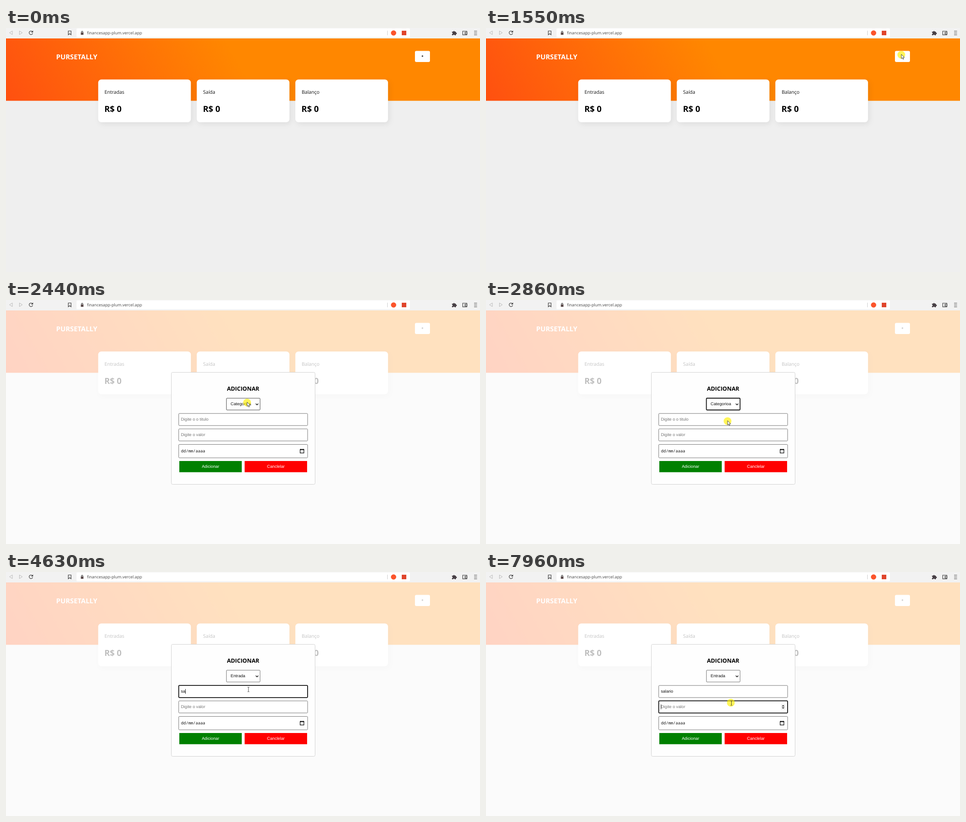
An HTML page for the animation above (8 s loop, 1042 by 538 pixels).

```html
<!DOCTYPE html>
<html lang="pt-BR">
<head>
<meta charset="utf-8">
<title>Finance app demo</title>
<style>
  html, body { margin: 0; width: 100%; height: 100%; overflow: hidden; background: #efefef; }
  svg { display: block; width: 1042px; height: 538px; }
  text { text-rendering: geometricPrecision; font-family: "Open Sans", "Noto Sans", sans-serif; }
  .bold { font-weight: 700; }
  .form text { font: 9.2px "Liberation Sans", Arial, sans-serif; fill: #111; }
  .form .heading { font: 700 12.5px "Open Sans", sans-serif; fill: #000; }
  .form .date { font: 8.85px "Noto Sans Mono", monospace; }
  .form .button { fill: #fff; text-anchor: middle; }
  .form .hint { fill: #757575; }
  .field { fill: #fff; stroke: #767676; stroke-width: 1; }
  .field.hover { stroke: #4f4f4f; }
  .field.focus { stroke: #101010; stroke-width: 1.8; }
  .card rect { fill: #fff; filter: drop-shadow(3px 4px 6px rgba(0, 0, 0, .07)); }
  .line { fill: none; stroke: #3b3b3b; stroke-width: 1.2; }
  .faint { fill: none; stroke: #b9b9b9; }
</style>
</head>
<body>
<svg viewBox="0 0 1042 538">
  <defs>
    <linearGradient id="sunset" gradientUnits="userSpaceOnUse" x1="100.5" y1="334" x2="521" y2="91.5">
      <stop offset="0" stop-color="#ff5010"/>
      <stop offset="1" stop-color="#ff8700"/>
    </linearGradient>
  </defs>

  <!-- page -->
  <rect width="1042" height="538" fill="#efefef"/>
  <rect y="23" width="1042" height="137.5" fill="url(#sunset)"/>
  <text class="bold" x="110.3" y="69" font-size="14.9" fill="#fff">PURSETALLY</text>
  <rect x="899" y="50.5" width="33" height="24.5" rx="3" fill="#fff"/>
  <text class="bold" x="915.5" y="65" font-size="8.5" text-anchor="middle">+</text>
  <g id="cards"></g>

  <!-- browser bar -->
  <rect width="1042" height="23" fill="#f2f2f2"/>
  <rect x="155" y="1" width="733" height="19.5" rx="2" fill="#fff"/>
  <path class="faint" d="M14 6.5V14.500L7.500 10.500ZM29.500 6.500V14.500L36 10.500Z"/>
  <path class="line" d="M58 8A4 4 0 1 0 58.700 11.800"/>
  <path d="M59.500 5.500V9.800H55.200Z" fill="#3b3b3b"/>
  <path class="line" d="M137 6.500H143V15L140 12.500L137 15Z"/>
  <rect x="164.500" y="10" width="5.800" height="5" rx=".6" fill="#5a4a4a"/>
  <path class="line" d="M165.800 10V8.800A1.600 1.600 0 0 1 169 8.800V10" stroke-width="1"/>
  <text x="178" y="14.200" font-size="9" fill="#444">financesapp-plum.vercel.app</text>
  <path d="M838.500 6V16" stroke="#ccc"/>
  <circle cx="852" cy="11" r="5.800" fill="#fb542b"/>
  <rect x="870" y="6" width="10" height="10" fill="#e0452c"/>
  <path d="M980.500 8H983.200A1.600 1.600 0 1 1 986.400 8H989V10.400A1.600 1.600 0 1 1 989 13.400V16H986.200A1.500 1.500 0 0 0 983.200 16H980.500V13.200A1.500 1.500 0 0 0 980.500 10.200Z" fill="#473f45"/>
  <path class="line" d="M1013 8.500V7H1004V15.200H1013V14M1009 9H1013.500V13.500H1009Z"/>
  <circle cx="1011" cy="11.200" r=".8" fill="#3b3b3b"/>
  <path class="line" d="M1029 7H1035.500M1029 11H1035.500M1029 15H1035.500"/>

  <!-- dialog -->
  <g id="dialog" class="form">
    <rect y="23" width="1042" height="515" fill="#fff" opacity=".75"/>
    <rect x="363.500" y="159.500" width="316" height="247" rx="3" fill="#fefefe" stroke="#d2d2d2"/>
    <text class="heading" x="521.300" y="200" text-anchor="middle">ADICIONAR</text>
    <rect id="category" class="field" x="484.500" y="216.500" width="74" height="26" rx="1.500"/>
    <text id="choice" x="493.800" y="232.400"></text>
    <path d="M549 228.500L551.800 231.300L554.600 228.500" fill="none" stroke="#111" stroke-width="1.400"/>
    <rect id="title" class="field" x="379.700" y="250.200" width="283.300" height="26.600" rx="1.500"/>
    <text id="titleText" x="384.400" y="266.400"></text>
    <rect id="amount" class="field" x="379.700" y="284.200" width="283.300" height="26.600" rx="1.500"/>
    <text class="hint" x="384.400" y="300.400">Digite o valor</text>
    <g id="spinner">
      <rect x="648.500" y="291" width="9.500" height="13" fill="#f0f0f0"/>
      <path d="M650.300 296.300L653.200 293.300L656.100 296.300ZM650.300 298.500L653.200 301.500L656.100 298.500Z" fill="#333"/>
    </g>
    <rect class="field" x="379.700" y="318.500" width="283.300" height="29.500" rx="1.500"/>
    <text class="date" x="384.800" y="336">dd/mm/aaaa</text>
    <path d="M646.600 329.500H654.800V337.400H646.600Z" fill="none" stroke="#000" stroke-width="1.200"/>
    <path d="M646 330H655.400M648.500 328V330M652.900 328V330" stroke="#000" stroke-width="1.600"/>
    <rect x="381" y="355" width="137.300" height="24.700" fill="#008000"/>
    <rect x="524.600" y="355" width="137.300" height="24.700" fill="#f00"/>
    <text class="button" x="449.600" y="370.400">Adicionar</text>
    <text class="button" x="593.200" y="370.400">Canclelar</text>
    <path id="caret" d="M0 -8.500V2.300" stroke="#111" stroke-width=".9"/>
  </g>

  <!-- pointer -->
  <g id="pointer">
    <circle id="glow" r="8.600" fill="#fff000" opacity=".65"/>
    <path id="arrow" d="M0 0V9.500L2.200 7.500L3.700 11L5.300 10.300L3.800 7H6.800Z" fill="#fff" stroke="#222" stroke-width=".8"/>
    <path id="beam" d="M-2 -5H-.5L0 -4.500L.5 -5H2M0 -4.500V4.500M-2 5H-.5L0 4.500L.5 5H2" fill="none" stroke="#333" stroke-width=".9"/>
  </g>
</svg>

<script>
const LOOP = 8000;
const OPEN = 1640, PICK = 2930;
const FOCUS = { category: 2510, title: 3620, amount: 7880 };
const WORD = "salario";
const KEYS = [4430, 4630, 4820, 5210, 6040, 6220, 6420];
const CLICKS = [[1490, 1640], [2380, 2580], [2790, 3000], [3550, 3680], [7800, LOOP]];

// start, end, number of held steps, evenly spaced waypoints
const MOVES = [
  [390, 1150, 12, [[970, 436], [964, 400], [950, 325], [938, 253], [932, 140], [930, 64], [918, 46], [916, 52]]],
  [1220, 1270, 2, [[914, 56], [913, 58]]],
  [1640, 2240, 10, [[883, 80], [800, 115], [690, 165], [590, 205], [540, 222], [530, 225]]],
  [2510, 2860, 6, [[530, 226], [531, 246], [531, 266]]],
  [3210, 3470, 5, [[531, 264], [531, 260], [531, 257], [532, 258], [533, 259]]],
  [7220, 7220, 1, [[533, 258]]],
  [7410, 7720, 5, [[533, 260], [534, 270], [537, 282], [539, 290], [539.500, 289]]]
];

const $ = id => document.getElementById(id);
const show = (id, on) => $(id).setAttribute("visibility", on ? "inherit" : "hidden");
const place = (id, x, y) => $(id).setAttribute("transform", `translate(${x} ${y})`);

$("cards").innerHTML = ["Entradas", "Saída", "Balanço"].map((name, i) => `
  <g class="card" transform="translate(${202.700 + i * 216.700} 113.500)">
    <rect width="203.700" height="94.300" rx="7"/>
    <text x="13.800" y="31.200" font-size="10.600" fill="#111">${name}</text>
    <text class="bold" x="13.500" y="71.500" font-size="18.400">R$ 0</text>
  </g>`).join("");

function pointerAt(t) {
  const move = MOVES.filter(m => t >= m[0]).pop();
  if (!move) return null;
  const [start, end, steps, points] = move;
  const last = Math.max(steps - 1, 1);
  const step = end > start ? Math.min(last, Math.floor((t - start) / (end - start) * last + 1e-6)) : 0;
  const at = step / last * (points.length - 1);
  const i = Math.min(Math.floor(at), points.length - 1);
  const a = points[i], b = points[i + 1] || a;
  return a.map((v, k) => v + (b[k] - v) * (at - i));
}

function draw(t) {
  const pos = pointerAt(t);
  const open = t >= OPEN;
  const focused = Object.keys(FOCUS).filter(id => t >= FOCUS[id]).pop();
  const typed = KEYS.filter(k => t >= k);
  const overList = t >= FOCUS.category && t < PICK;

  show("dialog", open);
  for (const id in FOCUS) {
    const f = $(id), x = +f.getAttribute("x"), y = +f.getAttribute("y");
    const over = open && !overList && pos[0] > x && pos[0] < x + +f.getAttribute("width") &&
      pos[1] > y && pos[1] < y + +f.getAttribute("height");
    f.setAttribute("class", "field" + (focused === id ? " focus" : over ? " hover" : ""));
    if (id === "amount") show("spinner", open && (over || focused === id));
  }

  $("choice").textContent = t < PICK ? "Categorioa" : "Entrada";
  $("titleText").textContent = WORD.slice(0, typed.length) || "Digite o o titulo";
  $("titleText").setAttribute("class", typed.length ? "" : "hint");

  const inTitle = focused === "title";
  const lastInput = inTitle ? typed[typed.length - 1] || FOCUS.title : FOCUS.amount;
  const caretOn = (inTitle || focused === "amount") && (t - lastInput) % 1060 < 530;
  show("caret", open && caretOn);
  const advance = inTitle && typed.length ? $("titleText").getComputedTextLength() : 0;
  place("caret", 384.800 + advance, inTitle ? 266.400 : 300.400);

  show("pointer", pos);
  if (pos) place("pointer", ...pos);
  const beam = t >= PICK;
  show("beam", pos && beam);
  show("arrow", pos && !beam);
  show("glow", pos && CLICKS.some(([a, b]) => t >= a && t < b));
  place("glow", beam ? -1.300 : 0, beam ? -.8 : 1);
}

const began = performance.now();
function tick() {
  draw((performance.now() - began) % LOOP);
  requestAnimationFrame(tick);
}
tick();
</script>
</body>
</html>
```
